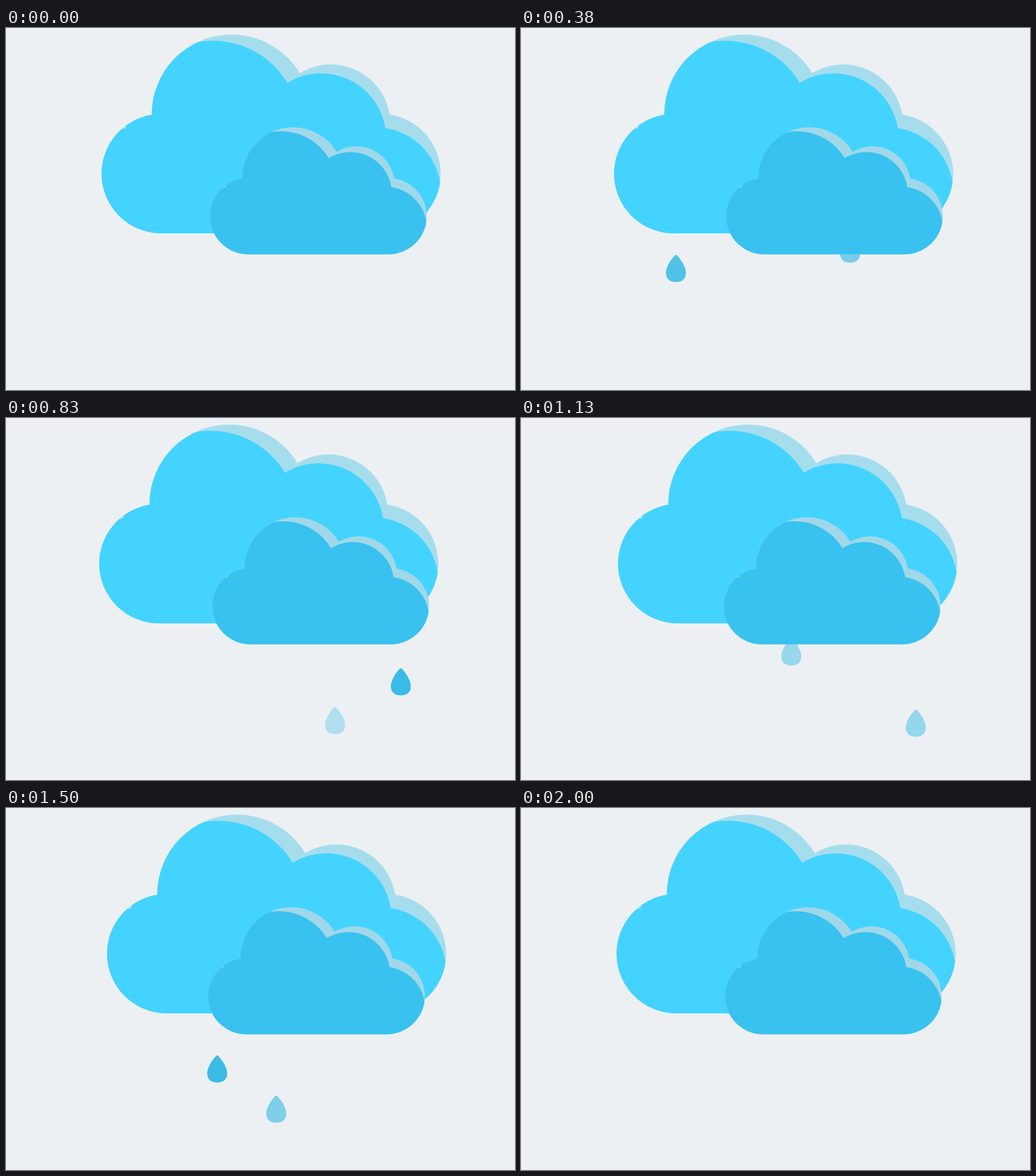
Animation of 887x631 px, one loop 2040 ms. Source, as an HTML page with a canvas:

```html
<!DOCTYPE html>
<html lang="en">
<head>
<meta charset="utf-8">
<title>Rain clouds</title>
<style>
html, body { margin: 0; height: 100%; overflow: hidden; background: #ecf0f3; }
canvas { display: block; }
</style>
</head>
<body>
<canvas id="stage" width="887" height="631"></canvas>
<script>
const ctx = document.getElementById('stage').getContext('2d');
const LOOP = 2040, STEP = 1000 / 24, LAST = 48;

// Cloud outline: x, y, radius, start angle, end angle of each bump
const cloud = new Path2D();
[
  [270.5, 254, 104, Math.PI / 2, 4.553],
  [393, 150.5, 139, 3.135, 5.738],
  [566, 167.5, 104, 4.154, 6.125],
  [653.5, 254, 104, 4.859, Math.PI * 2.5]
].forEach(bump => cloud.arc(...bump));
cloud.closePath();

// The lit rim is what an enlarged, shifted copy leaves uncovered
const cover = new Path2D();
cover.addPath(cloud, new DOMMatrix([1.09, 0, 0, 1.09, -67.9, 9.8]));

const dropShape = new Path2D(
  'M0 0C2 0 17.4 18 17.4 31.5C17.4 43 10 47.4 0 47.4C-10 47.4 -17.4 43 -17.4 31.5C-17.4 18 -2 0 0 0Z');

// y is the tip's height at time t, v its speed in px per ms
const drops = [
  { x: 270, y: 395.3, t: 375, v: .314, start: 40, rise: 387, end: 815, fall: 385 },
  { x: 573.5, y: 361.5, t: 375, v: .31, start: 93, rise: 430, end: 950, fall: 345 },
  { x: 688, y: 436, t: 833, v: .247, start: 270, rise: 560, end: 1397, fall: 545 },
  { x: 471, y: 449, t: 1333, v: .312, start: 937, rise: 405, end: 1750, fall: 405 },
  { x: 368, y: 379, t: 1333, v: .312, start: 1090, rise: 415, end: 1912, fall: 410 }
];

// Pairs of time and horizontal shift, eased in and out
const farKeys = [[0, 0], [600, -6.4], [1580, 9.8], [2000, 0]];
const nearKeys = [[0, 0], [800, 4.1], [1280, -4.2], [2000, 0]];

function shift(keys, t) {
  const i = Math.max(1, keys.findIndex(key => key[0] >= t));
  const [t0, a] = keys[i - 1], [t1, b] = keys[i];
  const f = (t - t0) / (t1 - t0);
  return a + (b - a) * f * f * (3 - 2 * f);
}

function drawCloud(x, y, scale, rim, body) {
  ctx.save();
  ctx.translate(x, y);
  ctx.scale(scale, scale);
  ctx.fillStyle = rim;
  ctx.fill(cloud);
  ctx.clip(cover);
  ctx.fillStyle = body;
  ctx.fill(cloud);
  ctx.restore();
}

function drawDrop(d, t) {
  const alpha = Math.min(1, (t - d.start) / d.rise, (d.end - t) / d.fall);
  if (alpha <= 0) return;
  ctx.save();
  ctx.globalAlpha = alpha;
  ctx.translate(d.x, d.y + d.v * (t - d.t));
  ctx.fillStyle = '#3abbe5';
  ctx.fill(dropShape);
  ctx.restore();
}

function draw(now) {
  const step = Math.min(LAST, Math.floor((now % LOOP + 4) / STEP));
  const t = Math.min(2000, step * STEP);
  ctx.fillStyle = '#ecf0f3';
  ctx.fillRect(0, 0, 887, 631);
  drops.forEach(d => drawDrop(d, t));
  drawCloud(shift(farKeys, t), 0, 1, '#a6dded', '#44d3ff');
  drawCloud(249.1 + shift(nearKeys, t), 165.7, .639, '#a1d8e9', '#39c2ef');
}

const begin = performance.now();
function tick() {
  draw(performance.now() - begin);
  requestAnimationFrame(tick);
}
tick();
</script>
</body>
</html>
```
